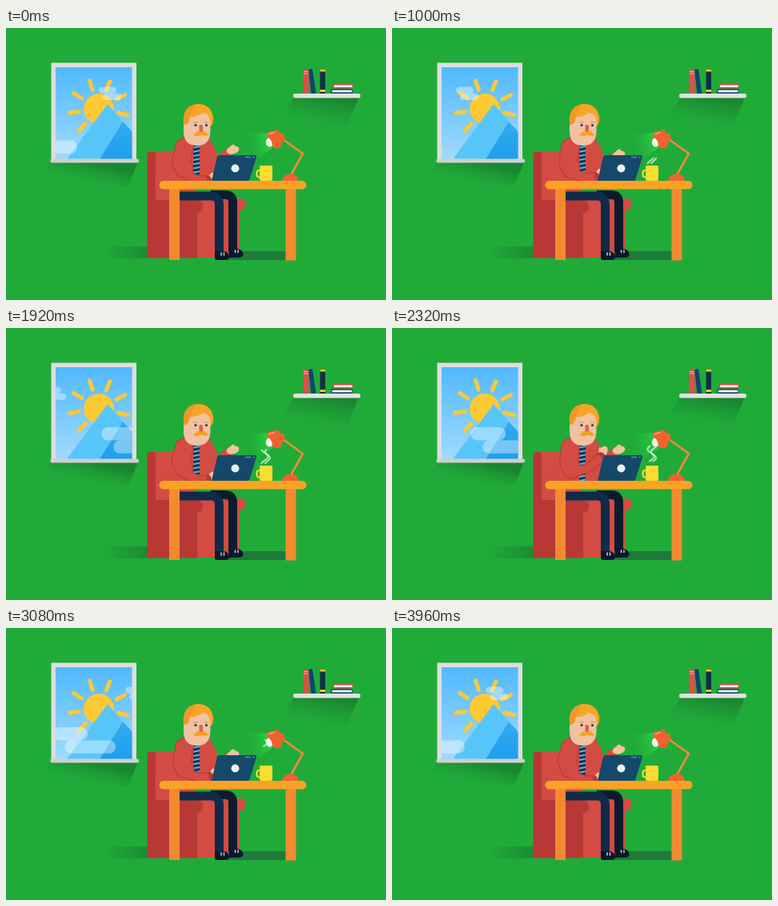
An HTML page with a canvas that plays this animation: 475x340 px, repeating every 4000 ms.

```html
<!DOCTYPE html>
<html lang="en">
<head>
<meta charset="utf-8">
<title>Man at a desk</title>
<style>
html, body { margin: 0; width: 100%; height: 100%; overflow: hidden; background: #20ab39; }
canvas { display: block; width: 475px; height: 340px; }
</style>
</head>
<body>
<canvas id="stage"></canvas>
<script>
const LOOP = 4000, STEP = 40, TYPING = 2000;
const canvas = document.getElementById('stage');
const ratio = window.devicePixelRatio || 1;
canvas.width = 475 * ratio;
canvas.height = 340 * ratio;
const ctx = canvas.getContext('2d');
ctx.scale(ratio, ratio);

const C = {
  wall: '#20ab39', red: '#d34c43', darkRed: '#b83835', skin: '#f1c2a2',
  hair: '#f8a427', navy: '#102b49', deepNavy: '#0a1b2f', laptop: '#15486a',
  top: '#faa225', leg: '#f28a31', lamp: '#f2622f', yellow: '#fbdc30',
  sun: '#fdc934', pale: '#dedede'
};

// Drawing helpers
function rect(x, y, w, h, color, r = 0) {
  ctx.fillStyle = color;
  ctx.beginPath();
  ctx.roundRect(x, y, w, h, r);
  ctx.fill();
}
function oval(x, y, rx, ry, color, angle = 0) {
  ctx.fillStyle = color;
  ctx.beginPath();
  ctx.ellipse(x, y, rx, ry, angle, 0, Math.PI * 2);
  ctx.fill();
}
function shape(d, color) {
  ctx.fillStyle = color;
  ctx.fill(new Path2D(d));
}
function line(d, color, width, cap = 'round') {
  ctx.strokeStyle = color;
  ctx.lineWidth = width;
  ctx.lineCap = cap;
  ctx.lineJoin = 'round';
  ctx.stroke(new Path2D(d));
}
function fade(x0, y0, x1, y1, from, to) {
  const g = ctx.createLinearGradient(x0, y0, x1, y1);
  g.addColorStop(0, from);
  g.addColorStop(1, to);
  return g;
}

// Motion helpers
const clamp = v => Math.min(1, Math.max(0, v));
const wrap = (v, min, span) => min + (((v - min) % span) + span) % span;
const ease = p => (1 - Math.cos(p * Math.PI)) / 2;
function between(keys, t) {
  const i = keys.findIndex(k => k.at > t);
  const a = keys[i - 1], b = keys[i];
  const e = ease((t - a.at) / (b.at - a.at));
  return { x: a.x + (b.x - a.x) * e, y: a.y + (b.y - a.y) * e };
}

// Shadow falling down and to the left of a ledge
function castShadow(x, y, w, drop) {
  const slant = drop * 0.42;
  shape(`M${x} ${y}H${x + w}L${x + w - slant} ${y + drop}L${x - slant} ${y + drop * 0.7}Z`,
    fade(x + w / 2, y, x + w / 2 - 8, y + drop * 1.1, 'rgba(20,95,40,.5)', 'rgba(32,171,57,0)'));
}

// Two stacked pills, the lower one shifted right
function cloud(x, y, h, upper, lower, shift) {
  ctx.beginPath();
  ctx.roundRect(x, y, upper, h, h / 2);
  ctx.roundRect(x + shift, y + h, lower, h, h / 2);
  ctx.fillStyle = 'rgba(255,255,255,.38)';
  ctx.fill();
}

function drawSun(x, y) {
  oval(x, y, 19, 19, C.sun);
  for (let i = 0; i < 9; i++) {
    const a = (12 + i * 40) * Math.PI / 180;
    const c = Math.cos(a), s = Math.sin(a);
    line(`M${x + 25 * c} ${y + 25 * s}L${x + 37 * c} ${y + 37 * s}`, C.sun, 5);
  }
}

function drawWindow(t) {
  castShadow(56, 168, 109, 30);
  rect(56.5, 43.5, 106.5, 121, C.pale);
  ctx.save();
  ctx.beginPath();
  ctx.rect(62, 49, 95.6, 115);
  ctx.clip();
  rect(62, 49, 96, 115, fade(0, 49, 0, 164, '#50b9ff', '#a0dafc'));
  drawSun(116, 101);
  shape('M76 164L127 95L146 117L117 164Z', '#58c5fa');
  shape('M146 117L158 130V164H117Z', fade(0, 117, 0, 164, '#33aaf2', '#1d9fec'));
  cloud(wrap(116 - 0.036 * t, 30, 144), 73.5, 8.3, 22, 23, 5);
  cloud(wrap(220 - 0.0525 * t, -50, 210), 124, 16.4, 44, 64, 15);
  ctx.restore();
  rect(55.5, 163.5, 110.5, 5, '#cfcfcf', 2);
}

function drawShelf() {
  castShadow(360, 87, 81, 39);
  rect(371.5, 52, 7, 30, '#dc5047', 1);
  line('M372 54.5H378M372 57H378', '#f3b5aa', 1, 'butt');
  shape('M378 52L383 51L387.5 81.5L381.5 82Z', '#104470');
  rect(392.5, 51, 6.5, 31, '#112f47');
  line('M392.5 53H399M392.5 78.5H399', '#f5c51d', 3, 'butt');
  rect(408.5, 70, 25.5, 5.5, '#d94b42', 2);
  rect(410, 71.5, 23, 2.5, '#fff', 1);
  rect(406, 76, 27.5, 6, '#14507d', 2);
  rect(407.5, 77.7, 25, 2.6, '#fff', 1);
  rect(359, 82, 84, 5.5, '#e2e2e2', 2.5);
}

function drawChair() {
  rect(118, 273, 60, 15, fade(118, 0, 178, 0, 'rgba(25,115,45,0)', 'rgba(25,105,45,.5)'));
  rect(262, 279, 88, 11, '#20783a');
  rect(180, 155, 56, 70, C.red, 4);
  rect(232, 213, 60, 74, C.red);
  rect(284, 213, 16, 15, C.red, 7);
  shape('M176.5 158Q176.5 155 180 155H184Q187 155 187 158V215H238Q246 215 246 223Q246 230 239 231V287.6H176.5Z', C.darkRed);
}

function hand(x, y, angle) {
  ctx.save();
  ctx.translate(x, y);
  ctx.rotate(angle);
  oval(0, 0, 8, 4.9, C.skin);
  oval(0, -4, 4, 2, C.skin, -0.5);
  ctx.restore();
}

const strokes = [
  { at: 0, x: 258, y: 188 }, { at: 320, x: 264, y: 155 }, { at: 640, x: 244, y: 178 },
  { at: 1020, x: 260, y: 183 }, { at: 1560, x: 253, y: 172 }, { at: TYPING, x: 258, y: 188 }
];

// The elbow swings out as the hand draws back
function drawNearArm(phase) {
  const { x, y } = between(strokes, phase);
  const ex = 221 - Math.max(0, 262 - x) * 0.6;
  const ey = 177 - (221 - ex) * 0.45;
  const angle = Math.atan2(y - ey, x - ex) - 0.62;
  const wx = x - 7 * Math.cos(angle), wy = y - 7 * Math.sin(angle);
  const upper = `M223 149L${ex} ${ey - 9}L${ex + 4} ${ey}`;
  const sleeve = `M${ex + 1} ${ey + 3}Q${ex + (wx - ex) * 0.6} ${Math.max(ey, wy) + 3} ${wx} ${wy}`;
  hand(x, y, angle);
  line(upper, C.darkRed, 23.5);
  line(sleeve, C.darkRed, 12);
  line(upper, C.red, 21.5);
  line(sleeve, C.red, 10, 'butt');
}

function drawFarArm(phase) {
  const press = Math.max(0, Math.cos((phase - 1040) / TYPING * Math.PI * 2)) ** 2;
  const y = 152.5 + 6 * press;
  line(`M256 152Q260 176 276 ${y + 5}`, C.red, 12);
  hand(283.5, y, -0.25);
}

function drawHead() {
  shape('M222 112Q224 96 240 95Q256 95 259 111Q260 118 256 123H224Q221 118 222 112Z', C.hair);
  shape('M222 121Q227 120 229 111Q238 112 246 106Q254 107 255.5 115V129Q255 147 239 147Q222 147 222 129Z', C.skin);
  shape('M222 112Q224 98 238 95Q230 104 229 116Q227 121 222 121Z', '#ef9728');
  for (const x of [237, 250.5]) {
    line(`M${x - 2.5} 118H${x + 2.5}`, '#e6a04f', 1.4);
    oval(x, 121.5, 2.4, 1.8, '#d9d2ce');
    oval(x, 121.5, 1.6, 1.6, '#26384c');
  }
  rect(241.5, 121, 4.5, 10, '#df604b', 1.5);
  shape('M233.5 133Q237 132 239 129.5Q242 128 244 130Q246 128 249 129.5Q251 132 254 133Q250 136 244 133.5Q238 137 233.5 133Z', '#f5a021');
}

function drawMan(t) {
  const phase = t % TYPING;
  drawFarArm(phase);
  shape('M226 134Q212 145 209.5 160Q209 178 222 191H262Q264 170 260 153Q258 141 252 136Z', C.red);
  rect(234, 144, 8, 47, '#183450');
  for (let y = 147; y < 190; y += 5.2) line(`M234 ${y + 2.5}L242 ${y + 1}`, '#69add5', 2, 'butt');
  drawNearArm(phase);
  drawHead();
}

function drawLegs() {
  line('M256 208.5H274Q283.5 208.5 283.5 218V279', C.deepNavy, 11, 'butt');
  line('M216 210H256Q266.5 210 266.5 221V282', C.navy, 11, 'butt');
  shape('M278.5 276H290Q296.5 278 296.5 283Q296 287 291 287H278.5Z', '#0b182b');
  shape('M261 279H273Q279 281 279 286Q279 290 274 290H264Q261 290 261 287Z', '#0b182b');
  line('M269 281V284M272.5 281V284M286.5 278V280.5M290 278V280.5', '#d6dde5', 1.4);
}

function drawTable() {
  rect(204, 200, 13, 90, C.leg);
  rect(349.5, 200, 13, 90.5, C.leg);
  rect(191.5, 191, 184, 10.5, C.top, 5.2);
}

function drawLamp() {
  shape('M331 131L293 132L313 164L333 150Z',
    fade(331, 140, 298, 146, 'rgba(45,225,70,.75)', 'rgba(32,171,57,0)'));
  line('M356 184L371 157L346 139', '#f38a3a', 2.6);
  oval(330, 142.5, 5, 6, '#fff4ec', 0.4);
  shape('M326 133Q326 130 329 130L338 127.5Q341 127 342 130L343 132L346 131Q348.5 134 348.5 140L345 143L344 149Q336 152 333 148Q333 139 326 136Z', C.lamp);
  line('M329 132.5L335 130.5', '#f9a283', 1.5);
  shape('M345 191Q346 182.5 355.5 182.5Q365 182.5 366 191Z', C.lamp);
}

// A rising wave, drawn only between its tail and head
function wisp(x, sway, length, tail, head) {
  ctx.beginPath();
  for (let p = tail; p <= head; p += 0.01) {
    ctx.lineTo(x - sway * Math.cos(p * Math.PI * 2 / length), 170 - 31 * p);
  }
  ctx.strokeStyle = 'rgba(225,248,222,.75)';
  ctx.lineWidth = 2;
  ctx.lineCap = 'butt';
  ctx.stroke();
}

function drawSteam(t) {
  const head = clamp((t - 250) / 2800), tail = clamp((t - 2200) / 1250);
  wisp(323.5, 4, 0.6, tail, head);
  wisp(327, 3, 0.5, tail, head);
}

function drawDeskItems(t) {
  shape('M264 161Q265 159 267 159H311Q313.5 159 313 161.5L304.5 189Q304 191 302 191H257Z', C.laptop);
  line('M299 161.5H306M308.5 161.5H310.5', '#5c91b4', 1.3, 'butt');
  oval(286.5, 175.5, 5, 5, '#e9f1f4');
  drawSteam(t);
  line('M318 178H316Q313.5 178 313.5 182Q313.5 186.5 316 186.5H318', C.yellow, 2.2);
  rect(317, 172, 16, 19, C.yellow, [1, 1, 2.5, 2.5]);
}

function draw(t) {
  rect(0, 0, 475, 340, C.wall);
  drawWindow(t);
  drawShelf();
  drawChair();
  drawMan(t);
  drawLegs();
  drawLamp();
  drawTable();
  drawDeskItems(t);
}

const start = performance.now();
function tick() {
  const ms = (performance.now() - start) % LOOP;
  draw(Math.floor(ms / STEP) * STEP);
  requestAnimationFrame(tick);
}
tick();
</script>
</body>
</html>
```
